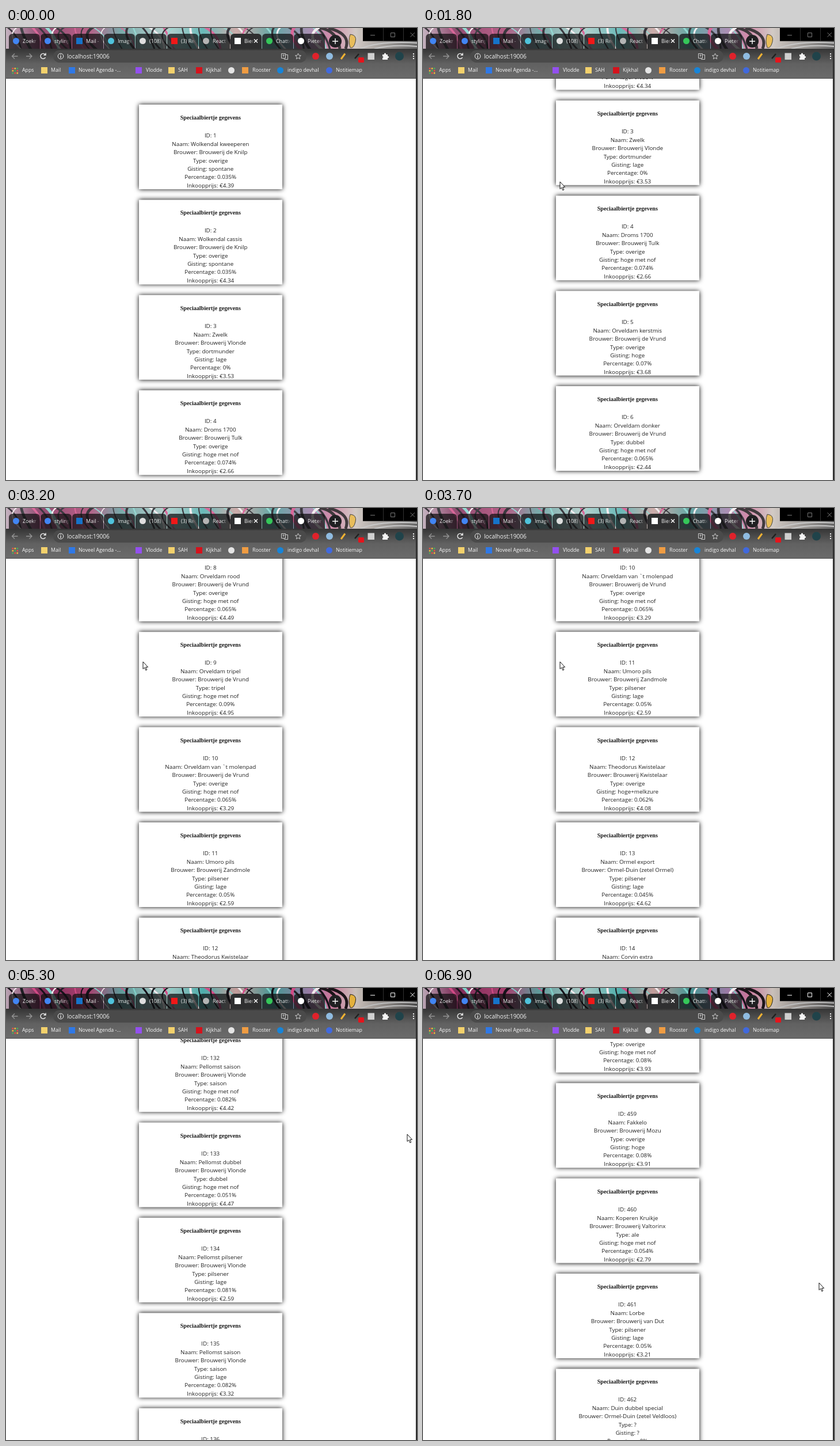
Recreate the animation shown at these times as an HTML page. Size 714 by 785 pixels, loop 7.1 s.

```html
<!DOCTYPE html>
<html lang="nl">
<head>
<meta charset="utf-8">
<title>Speciaalbiertjes</title>
<style>
html, body { margin: 0; width: 100%; height: 100%; overflow: hidden; background: #fff; }
#stage { position: relative; width: 714px; height: 785px; overflow: hidden; background: #fff;
  font-family: "Open Sans", "Noto Sans", sans-serif; }
#page { position: absolute; left: 0; top: 88px; width: 712px; height: 697px; overflow: hidden; }
#edge { position: absolute; left: 712px; top: 36px; width: 2px; height: 749px; background: #2b2b2b; }
.card { position: absolute; left: 231px; top: 0; width: 248.5px; height: 146.6px; background: #fff;
  box-shadow: 0 0 8px #000; text-align: center; white-space: pre; color: #222; }
.card h4 { position: absolute; left: 0; right: 0; top: 16px; margin: 0; color: #1a1a1a;
  font: bold 10.1px/14px "Liberation Serif", serif; }
.card div { position: absolute; left: 0; right: 0; top: 46.3px; font-size: 9.86px; line-height: 14.4px; }
#chrome { position: absolute; left: 0; top: 0; width: 714px; height: 88px; }
#chrome > svg { position: absolute; left: 0; top: 0; }
.tab { position: absolute; top: 10px; width: 54px; height: 26px; border-radius: 6px 6px 0 0;
  background: rgba(14,14,16,.72); }
.tab.on { background: #2f2f30; }
.tab span { position: absolute; left: 24px; top: 5px; width: 26px; overflow: hidden; white-space: nowrap;
  font-size: 8.9px; line-height: 15px; color: #f4f4f4;
  -webkit-mask-image: linear-gradient(90deg, #000 65%, transparent); mask-image: linear-gradient(90deg, #000 65%, transparent); }
.tab.on span { width: 17px; }
.dot { position: absolute; width: 11px; height: 11px; }
.dot.o { border-radius: 50%; }
.tab .dot { left: 6.5px; top: 7px; }
.mark { position: absolute; top: 66px; font-size: 8.75px; line-height: 15px; color: #f8f8f8; white-space: nowrap; }
#url { position: absolute; left: 106px; top: 41px; font-size: 10.1px; line-height: 16px; color: #f4f4f4; }
#cursor { position: absolute; left: 0; top: 0; }
</style>
</head>
<body>
<div id="stage">
  <div id="page"></div>
  <div id="edge"></div>
  <div id="chrome">
    <svg width="714" height="88" fill="none">
      <defs>
        <linearGradient id="paint">
          <stop offset="0" stop-color="#b9a4b3"/><stop offset=".08" stop-color="#7d2c58"/>
          <stop offset=".2" stop-color="#a8406f"/><stop offset=".28" stop-color="#5f9a9a"/>
          <stop offset=".39" stop-color="#a9c8c4"/><stop offset=".48" stop-color="#4dadab"/>
          <stop offset=".56" stop-color="#c39c9a"/><stop offset=".65" stop-color="#469693"/>
          <stop offset=".74" stop-color="#9a7aa5"/><stop offset=".79" stop-color="#c8759a"/>
          <stop offset=".85" stop-color="#c9c0ba"/><stop offset="1" stop-color="#4a4a4a"/>
        </linearGradient>
        <linearGradient id="bar" x2="0" y2="1">
          <stop offset="0" stop-color="#353535"/><stop offset=".5" stop-color="#616161"/>
          <stop offset="1" stop-color="#6b6b6b"/>
        </linearGradient>
      </defs>
      <path fill="url(#paint)" d="M0 0H714V36H0z"/>
      <g id="strokes"></g>
      <path d="M545 0Q575 4 580 36M560 0Q600 10 590 36" stroke="#1b1418" stroke-width="5"/>
      <path d="M598 11Q610 12 607 24T598 34Q594 22 598 11z" fill="#e3b03c" stroke="#222"/>
      <path d="M615 36Q650 22 714 26M640 36Q670 28 714 32" stroke="#bdbdbd" stroke-width="2"/>
      <path id="haze" fill="#fff" fill-opacity=".16" d="M0 0H714V36H0z"/>
      <path fill="url(#bar)" d="M0 36H712V88H0z"/>
      <path stroke="#484848" d="M0 87.5H712"/>
      <rect x="82" y="38.5" width="440" height="21.5" rx="10.7" fill="#4a4a4a"/>
      <path fill="#000" d="M620 0H714V22H620z"/>
      <path stroke="#303030" d="M655.5 0V22M690.5 0V22M620 22.5H714"/>
      <path id="controls" d="M633 12.5H641M668.5 8.5H675.5V15.5H668.5zM702.5 8L710 15.5M710 8L702.5 15.5"/>
      <path stroke="#929292" stroke-width="1.4"
        d="M20.5 49H10.5M15 44.5L10.5 49L15 53.5M35 49H45M40.5 44.5L45 49L40.5 53.5"/>
      <g stroke="#f1f1f1" stroke-width="1.4">
        <path d="M68 46A4.5 4.5 0 1 0 68.5 51M69 43.5V47H65.5"/>
        <circle cx="95" cy="49" r="4.8" stroke-width="1"/>
        <path d="M95 48.5V52M95 46V47.3"/>
      </g>
      <g stroke="#ccc">
        <path d="M478.5 44.5H485.5V52.5H478.5zM485.5 46.5H489.5V54.5H483.5L482.5 52.5M480.5 47H484M482 47V50"/>
        <path d="M507.5 44L509 47.5L512.5 47.8L509.8 50.2L510.6 53.8L507.5 51.9L504.4 53.8L505.2 50.2L502.5 47.8L506 47.5z"/>
      </g>
      <circle cx="538" cy="49" r="6" fill="#e0222b"/>
      <circle cx="562" cy="49" r="6" fill="#8fbbe0"/>
      <path d="M582 54L589 44.5" stroke="#f2b233" stroke-width="3"/>
      <path d="M606 53L613 45" stroke="#202020" stroke-width="2.5"/>
      <rect x="612" y="51" width="10" height="9" rx="1.5" fill="#e5141c"/>
      <rect x="628.5" y="43.5" width="11.5" height="11.5" fill="#cfcfcf"/>
      <path fill="#f5f5f5" d="M654 46H657V44.5Q658.5 42.5 660 44.5V46H663V49H664.5Q666 50.5 664.5 52H663V55H654V52Q657 50.5 654 49z"/>
      <circle cx="683.5" cy="49" r="7.5" fill="#20434a"/>
      <path fill="#f3f3f3" d="M707 44h2v2h-2zM707 48h2v2h-2zM707 52h2v2h-2z"/>
      <g id="apps"></g>
    </svg>
    <div id="url">localhost:19006</div>
  </div>
  <svg id="cursor" width="12" height="18" viewBox="-1 -1 12 18">
    <path d="M0 0V12.5L2.8 10L4.8 14.8L6.8 14L4.8 9.3H8.6z" fill="#fff" stroke="#111"/>
  </svg>
</div>
<script>
const $ = id => document.getElementById(id);
const el = (parent, tag, cls, text = '') => {
  const node = document.createElement(tag);
  node.className = cls;
  node.textContent = text;
  return parent.appendChild(node);
};
const rand = n => { const v = Math.sin(n * 12.9898) * 43758.5453; return v - Math.floor(v); };

// Browser frame
const chrome = $('chrome');
const inks = ['#17121a', '#f1e9ec', '#1d1d22', '#d14b86', '#17121a', '#7fd0c8'];
$('strokes').innerHTML = Array.from({ length: 44 }, (_, i) => {
  const x = i * 12.7 + rand(i) * 10;
  const bend = (rand(i + 90) - .5) * 70;
  return `<path d="M${x} -3Q${x + bend} 12 ${x + bend * .4 + 18} 40" stroke="${inks[i % 6]}" stroke-width="${1.5 + rand(i + 50) * 4}"/>`;
}).join('');

const tabs = [
  ['Zoekr', '#4285f4', 'o'], ['styling', '#4285f4', 'o'], ['Mail - in', '#1673c9', ''],
  ['Image', '#4fc3dc', 'o'], ['(108) b', '#dedede', 'o'], ['(3) Rec', '#f01818', ''],
  ['React', '#b4b4b4', 'o'], ['Bier', '#fff', ''], ['Chatte', '#35c759', 'o'], ['Pieter', '#fff', 'o']
];
tabs.forEach(([label, color, shape], i) => {
  const tab = el(chrome, 'div', i === 7 ? 'tab on' : 'tab');
  tab.style.left = 5 + i * 55 + 'px';
  el(tab, 'i', 'dot ' + shape).style.background = color;
  el(tab, 'span', '', label);
});
chrome.insertAdjacentHTML('beforeend', `<svg width="714" height="36" fill="none" stroke="#fff" stroke-width="1.4">
  <circle cx="572" cy="23" r="11" fill="#202022" stroke="none"/>
  <path d="M567 23H577M572 18V28M431 19.5L437 25.5M437 19.5L431 25.5"/></svg>`);

const marks = [
  [28, 'Apps'], [78, 'Mail', 61, '#f3d16c', ''], [126, 'Noveel Agenda -...', 109, '#2f78e6', ''],
  [243, 'Vlodde', 225, '#9350f0', ''], [299, 'SAH', 282, '#f3d16c', ''], [347, 'Kijkhal', 330, '#d5121c', ''],
  [0, '', 386, '#e5e5e5', 'o'], [428, 'Rooster', 410, '#ef9c42', ''],
  [489, 'indigo devhal', 471, '#1784d8', 'o'], [573, 'Notitiemap', 556, '#4169dd', 'o']
];
for (const [x, label, ix, color, shape] of marks) {
  el(chrome, 'div', 'mark', label).style.left = x + 'px';
  if (!ix) continue;
  const icon = el(chrome, 'i', 'dot ' + shape);
  icon.style.cssText = `left:${ix}px;top:68px;background:${color}`;
}
const dots = ['#ea4f45', '#f1b83a', '#49ad5b'];
$('apps').innerHTML = Array.from({ length: 9 }, (_, i) =>
  `<rect x="${10.5 + i % 3 * 4}" y="${69 + (i / 3 | 0) * 4}" width="2.6" height="2.6" fill="${dots[(i + (i / 3 | 0)) % 3]}"/>`).join('');

// Beer list: name, brewer, type, fermentation, percentage, price
const nof = 'hoge met nof', vrund = 'Brouwerij de Vrund', vlonde = 'Brouwerij Vlonde';
const knilp = 'Brouwerij de Knilp', corvin = 'Brasserie Corvin et Plontekamer';
const stekerij = 'Gueuzestekerij Pellomst', zand = 'Brouwerij Zandmole';
const beers = {
  1: ['Wolkendal kweeperen', knilp, 'overige', 'spontane', .035, '4.39'],
  2: ['Wolkendal cassis', knilp, 'overige', 'spontane', .035, '4.34'],
  3: ['Zwelk', vlonde, 'dortmunder', 'lage', 0, '3.53'],
  4: ['Droms 1700', 'Brouwerij Tulk', 'overige', nof, .074, '2.66'],
  5: ['Orveldam kerstmis', vrund, 'overige', 'hoge', .07, '3.68'],
  6: ['Orveldam donker', vrund, 'dubbel', nof, .065, '2.44'],
  7: ['Orveldam helder', vrund, 'overige', nof, .065, '2.16'],
  8: ['Orveldam rood', vrund, 'overige', nof, .065, '4.49'],
  9: ['Orveldam tripel', vrund, 'tripel', nof, .09, '4.95'],
  10: ['Orveldam van `t molenpad', vrund, 'overige', nof, .065, '3.29'],
  11: ['Umoro pils', zand, 'pilsener', 'lage', .05, '2.59'],
  12: ['Theodorus Kwistelaar', 'Brouwerij Kwistelaar', 'overige', 'hoge+melkzure', .062, '4.08'],
  13: ['Ormel export', 'Ormel-Duin (zetel Ormel)', 'pilsener', 'lage', .045, '4.62'],
  14: ['Corvin extra', corvin, 'saison', nof, .07, '2.86'],
  15: ['Corvin extra vieille', corvin, 'saison', nof, .07, '4.46'],
  16: ['Vestulon dubbel', 'Brouwerij Krabbendoel', 'dubbel', nof, .078, '2.70'],
  311: ['Vlonde export', vlonde, 'pilsener', 'lage', .05, '2.25'],
  312: ['Vlonde tarwebier', vlonde, 'witbier', nof, .05, '3.64'],
  313: ['Pellomst gueuze', stekerij, 'gueuze', 'spontane', .055, '3.47'],
  314: ['Pellomst kriek', stekerij, 'kriekenbier', 'spontane', .06, '4.43'],
  315: ['Drolme', zand, 'overige', nof, .085, '3.12'],
  458: ['Fakkelo donker', 'Brouwerij Mozu', 'overige', nof, .08, '3.93'],
  459: ['Fakkelo', 'Brouwerij Mozu', 'overige', 'hoge', .08, '3.91'],
  460: ['Koperen Kruikje', 'Brouwerij Valtorinx', 'ale', nof, .054, '2.79'],
  461: ['Lorbe', 'Brouwerij van Dut', 'pilsener', 'lage', .05, '3.21'],
  462: ['Duin dubbel special', 'Ormel-Duin (zetel Veldloos)', '?', '?', 0, '3.05']
};
const stems = ['Grimvoort', 'Wolkendal', 'Pellomst', 'Orveldam', 'Brasquel', 'Vestulon'];
const kinds = ['dubbel', 'tripel', 'overige', 'pilsener', 'saison', 'witbier'];
const brewers = [vrund, knilp, vlonde, zand, 'Brouwerij Krabbendoel'];
const pick = (list, seed) => list[Math.floor(rand(seed) * list.length)];
const beerAt = id => beers[id] || [
  `${pick(stems, id >> 2)} ${pick(kinds, id)}`, pick(brewers, id >> 2), pick(kinds, id),
  pick([nof, nof, 'hoge', 'lage'], id + 7), Math.round(45 + rand(id + 3) * 45) / 1000, (2 + rand(id + 5) * 3).toFixed(2)
];
const describe = id => {
  const [name, brewer, type, yeast, pct, price] = beerAt(id);
  return `ID: ${id}\nNaam: ${name}\nBrouwer: ${brewer}\nType: ${type}\nGisting: ${yeast}\nPercentage: ${pct}%\nInkoopprijs: €${price}`;
};

const PITCH = 165.4, FIRST = 45;
const cards = Array.from({ length: 6 }, () => {
  const box = el($('page'), 'div', 'card');
  el(box, 'h4', '', 'Speciaalbiertje gegevens');
  return { box, text: el(box, 'div', ''), id: 0 };
});

// Motion: rows of time followed by values
const scrollPath = [[1300, 0], [1800, 338], [2400, 656], [3200, 1241], [4300, 1969], [4900, 1969], [5900, 51377], [6400, 75721]];
const cursorPath = [[200, 716, 770], [1200, 238, 267], [3700, 238, 267], [4300, 632, 170],
  [4600, 697, 156], [4900, 697, 157], [5900, 696, 399], [6400, 688, 512]];
const along = (path, t) => {
  const next = path.findIndex(row => row[0] > t);
  if (next === 0) return path[0].slice(1);
  if (next < 0) return path[path.length - 1].slice(1);
  const a = path[next - 1], b = path[next], k = (t - a[0]) / (b[0] - a[0]);
  return a.slice(1).map((v, i) => v + (b[i + 1] - v) * k);
};

function draw(t) {
  const [scroll] = along(scrollPath, t);
  const [x, y] = along(cursorPath, t);
  const first = Math.max(1, Math.floor((scroll - FIRST) / PITCH));
  cards.forEach((card, i) => {
    const id = first + i;
    if (card.id !== id) card.text.textContent = describe(card.id = id);
    card.box.style.transform = `translateY(${(FIRST + (id - 1) * PITCH - scroll).toFixed(1)}px)`;
  });
  $('cursor').style.transform = `translate(${Math.round(x) - 1}px, ${Math.round(y) - 1}px)`;
  const active = t >= 4700;
  $('controls').setAttribute('stroke', active ? '#fff' : '#777');
  $('haze').style.display = active ? 'none' : '';
}

const start = performance.now();
let shown = -1;
function tick() {
  const step = Math.floor((performance.now() - start) % 7100 / 100) * 100;
  if (step !== shown) draw(shown = step);
  requestAnimationFrame(tick);
}
tick();
</script>
</body>
</html>
```
